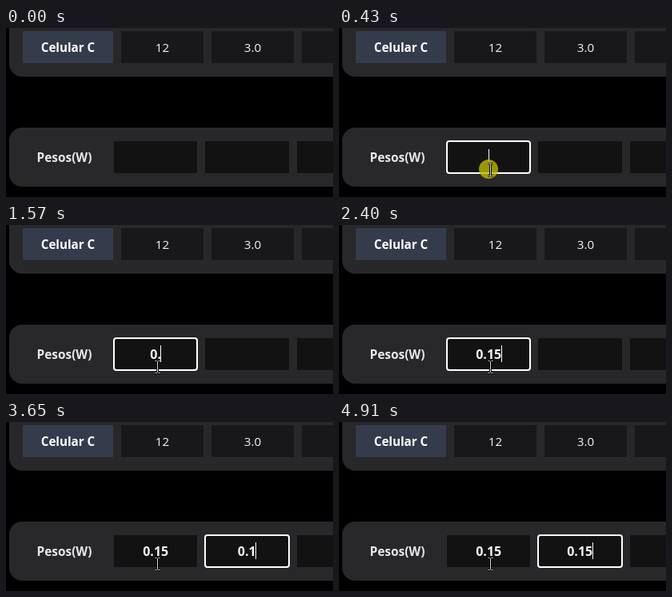
Animation of 409x212 px, one loop 5.37 s. Source, as an HTML page with a canvas:

```html
<!DOCTYPE html>
<html lang="es">
<head>
<meta charset="utf-8">
<style>
  html, body { margin: 0; width: 100%; height: 100%; overflow: hidden; background: #000; }
  canvas { display: block; }
</style>
</head>
<body>
<canvas id="stage" width="409" height="212"></canvas>
<script>
const ctx = document.getElementById('stage').getContext('2d');
const LOOP = 5370;
const FIELDS = [
  { x: 135, w: 104, mid: 187, keys: [1390, 1570, 2190, 2400] },
  { x: 249, w: 105, mid: 301, keys: [3130, 3390, 3650, 3850] }
];
const CARET_SHIFT = [0, 4, 6, 11, 16];
const VALUE = '0.15';
const FOCUS_FIRST = 340, FOCUS_SECOND = 2770;
const within = (t, from, to) => t >= from && t < to;

function rect(x, y, w, h, color, radius = 0) {
  ctx.fillStyle = color;
  ctx.beginPath();
  ctx.roundRect(x, y, w, h, radius);
  ctx.fill();
}

function label(text, x, baseline, weight, size, color = '#f4f4f5') {
  ctx.font = `${weight} ${size}px "Open Sans", "Noto Sans", sans-serif`;
  ctx.textAlign = 'center';
  ctx.fillStyle = color;
  ctx.fillText(text, x, baseline);
}

function drawTable() {
  rect(0, 0, 409, 212, '#000');
  rect(4, -40, 440, 101, '#28282a', 16);
  rect(4, 125, 440, 74, '#28282a', 16);
  rect(21, 4, 113, 40, '#343b4b');
  for (const x of [144, 257, 370]) rect(x, 4, 103, 40, '#18181a');
  label('Celular C', 77.5, 30, 700, 15.2, '#fff');
  label('12', 195.5, 30, 400, 15.2);
  label('3.0', 308.5, 30, 400, 15.2);
  label('Pesos(W)', 73, 168, 700, 15.4, '#e8e8ea');
  rect(364, 142, 60, 40, '#121212');
}

function drawField({ x, w, mid, keys }, t, focused) {
  const typed = keys.filter(k => t >= k).length;
  rect(x, 142, w, 40, '#121212');
  label(VALUE.slice(0, typed), mid + 0.2, 168, 700, 16);
  if (!focused) return;
  ctx.strokeStyle = '#fff';
  ctx.lineWidth = 2;
  ctx.beginPath();
  ctx.roundRect(x, 142, w, 40, 3);
  ctx.stroke();
  const blinkedOff = within(t, 970, 1390) || within(t, 4360, 4910);
  if (!blinkedOff) rect(mid + CARET_SHIFT[typed], typed ? 151 : 152, 1, 21, '#fff');
}

function outlined(path, fill) {
  ctx.strokeStyle = '#000';
  ctx.lineWidth = fill ? 1.5 : 3;
  ctx.stroke(path);
  if (fill) {
    ctx.fillStyle = '#fff';
    ctx.fill(path);
  } else {
    ctx.strokeStyle = '#ddd';
    ctx.lineWidth = 1;
    ctx.stroke(path);
  }
}

const BEAM = new Path2D('M-3 -7.5H-1M1 -7.5H3M0 -7V7M-3 7.5H-1M1 7.5H3');
const ARROW = new Path2D('M0 0V16L3.7 12.5L6.2 18.5L8.7 17.4L6.2 11.7H11.5Z');

function drawPointer(t) {
  if (t < 100) return;
  const step = Math.floor((t - 100) / 48) * 48;
  const p = Math.min(1, step / 240);
  const left = (1 - p) ** 2;
  const x = Math.round(189 + 56 * left);
  const y = Math.round(178 + 24 * left);
  if (within(t, FOCUS_FIRST, 490)) {
    ctx.fillStyle = 'rgba(190, 184, 0, .8)';
    ctx.beginPath();
    ctx.arc(187, 177, 12, 0, Math.PI * 2);
    ctx.fill();
  }
  const overField = x < 239 && y < 182;
  ctx.save();
  ctx.translate(overField ? x + 0.5 : x, y);
  outlined(overField ? BEAM : ARROW, !overField);
  ctx.restore();
}

function frame(now) {
  const t = now % LOOP;
  drawTable();
  drawField(FIELDS[0], t, within(t, FOCUS_FIRST, FOCUS_SECOND));
  drawField(FIELDS[1], t, t >= FOCUS_SECOND);
  drawPointer(t);
  requestAnimationFrame(() => frame(performance.now()));
}
frame(performance.now());
</script>
</body>
</html>
```
